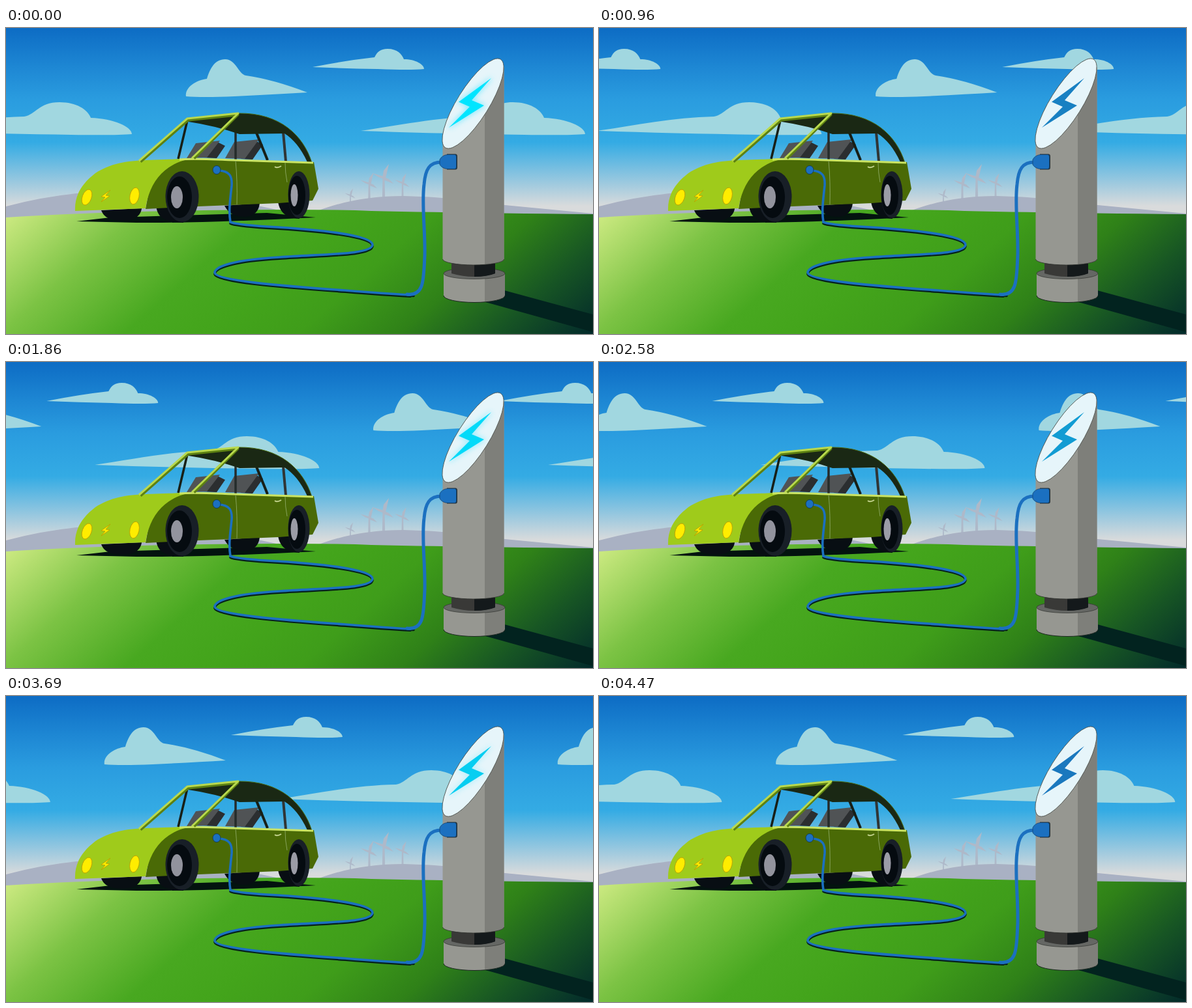
An HTML page that plays this animation: 900 by 470 pixels, repeating every 4500 ms.

```html
<!DOCTYPE html>
<html lang="en">
<head>
<meta charset="utf-8">
<title>Charging car</title>
<style>
html, body { margin: 0; width: 100%; height: 100%; overflow: hidden; background: #0d6bc3; }
svg { display: block; width: 900px; height: 470px; }
</style>
</head>
<body>
<svg viewBox="0 0 900 470">
<defs>
  <linearGradient id="sky" x2="0" y2="1">
    <stop stop-color="#0d6cc4"/><stop offset=".2" stop-color="#1d86d3"/>
    <stop offset=".38" stop-color="#2a9cdf"/><stop offset=".61" stop-color="#34abe4"/>
    <stop offset=".95" stop-color="#d9dbdc"/>
  </linearGradient>
  <linearGradient id="meadow" gradientUnits="userSpaceOnUse" x1="0" y1="287" x2="485" y2="838">
    <stop stop-color="#cdea82"/><stop offset=".18" stop-color="#7cc344"/>
    <stop offset=".35" stop-color="#48a820"/><stop offset=".47" stop-color="#43a41b"/>
    <stop offset=".59" stop-color="#3f9d1a"/><stop offset=".73" stop-color="#2f8118"/>
    <stop offset=".86" stop-color="#175524"/><stop offset="1" stop-color="#02292b"/>
  </linearGradient>
  <filter id="blur" x="-30%" y="-30%" width="160%" height="160%"><feGaussianBlur stdDeviation="4"/></filter>
  <g id="clouds" fill="#a1d7e0">
    <path d="M-151 158C-95 150-35 137 28 136C46 133 50 114 82 114C108 114 125 125 130 138C165 139 193 152 193 163Q170 165 100 164Q-40 162-151 158Z"/>
    <path d="M276 105C274 91 292 80 308 78C313 62 320 48 336 48C353 48 356 71 368 73Q410 79 462 99Q410 102 350 105Q300 107 276 105Z"/>
    <path d="M470 60Q520 50 565 45C569 37 574 32 585 32C600 32 607 40 610 48C628 48 641 56 641 63Q620 65 570 63Q520 62 470 60Z"/>
  </g>
  <g id="turbine" fill="#aeb9c9">
    <path d="M-1.5 0H1.5L2.2 34H-2.2Z"/>
    <path d="M-2 1L0-11L8-21L3 1ZM2 3L-8-1L-17-7L0-2ZM-1-2L8 2L15 9L-1 3Z"/>
  </g>
  <path id="bolt" d="M744 77L694 113.5L711 121L679 153L733 119L714 111Z"/>
  <path id="hose" d="M344 298C349 301 370 303 400 305C490 310 562 319 562 333C561 348 490 347 420 352C350 356 320 366 320 376C322 388 420 396 520 403Q580 408 620 410"/>
</defs>

<path fill="url(#sky)" d="M0 0H900V288H0Z"/>
<g id="drift">
  <use href="#clouds" x="-695"/><use href="#clouds"/><use href="#clouds" x="695"/>
</g>

<!-- landscape -->
<use href="#turbine" transform="translate(579 230)"/>
<use href="#turbine" transform="translate(557 239) scale(.8)"/>
<use href="#turbine" transform="translate(608 238) scale(.7)"/>
<use href="#turbine" transform="translate(528 257) scale(.5)"/>
<path fill="#a9b1c3" d="M0 274Q60 258 120 253Q280 245 440 285H468Q530 258 610 258Q690 260 765 272L900 285V300H0Z"/>
<path fill="url(#meadow)" d="M0 291Q110 284 250 281Q460 277 560 281Q700 284 900 286V470H0Z"/>
<path fill="#02231f" d="M764 403L900 440V467L735 421Z"/>

<!-- car -->
<path fill="#03130f" d="M108 297L160 291L400 284L475 291Q300 300 200 299Z"/>
<g fill="#080e13">
  <path d="M146 280C150 291 160 296 180 296C197 296 207 288 208 277Z"/>
  <path d="M335 273C342 286 352 290 368 290C380 289 388 281 389 269Z"/>
  <path d="M230 274C233 290 240 298 272 299V260Z"/>
  <path d="M417 267C420 284 430 292 450 293V255Z"/>
</g>
<g fill="#505355">
  <path fill="#2b2e30" d="M302 199L322 174L336 181L323 200ZM360 201L380 172L394 179L378 202Z"/>
  <path d="M277 200L291 177L328 173L308 199ZM336 200L350 175L388 171L366 201Z"/>
</g>
<g fill="none" stroke="#171f17">
  <path stroke-width="3.5" d="M278 142L264 201"/>
  <path stroke-width="4" d="M384 161L401 203"/>
  <path stroke-width="3.5" stroke="#252b2b" d="M352 136V202"/>
  <path stroke-width="4" stroke="#303535" d="M425 160L429 205"/>
</g>
<path fill="#1a2814" d="M280 140L356 131C420 130 456 165 469 207L462 206C452 184 440 170 427 162L358 163Q320 150 280 144Z"/>
<path fill="none" stroke="#4a6910" d="M356 131C420 130 456 165 469 207"/>
<path fill="#4a6a06" d="M214 278L222 235Q240 204 285 200L472 206L479 247L470 265L418 269L295 274L232 277Z"/>
<path fill="#9fcb1b" d="M106 281C105 258 115 240 137 223C160 208 185 204 215 203Q250 202 290 200C245 205 220 235 214 277Z"/>
<path fill="none" stroke="#cbe463" stroke-width="3" d="M266 202Q285 200 350 203L471 207"/>
<g fill="none" stroke-linejoin="round">
  <path stroke="#5d8012" stroke-width="5" d="M206 205L279 141L355 133L288 200"/>
  <path stroke="#b9d94e" stroke-width="3" d="M204 204L278 139L356 131L285 200"/>
  <path stroke="#86a35a" d="M352 204Q355 235 354 271M428 207Q428 222 431 237"/>
  <path stroke="#c0d08a" stroke-width="2" d="M412 213Q416 216 422 212"/>
</g>
<ellipse cx="270" cy="259" rx="25.5" ry="39" fill="#181f27"/>
<ellipse cx="266" cy="260" rx="19" ry="32" fill="#050b10"/>
<ellipse cx="262" cy="260" rx="9" ry="17" fill="#92939d"/>
<ellipse cx="449" cy="256" rx="16.5" ry="36" fill="#181f27"/>
<ellipse cx="446" cy="257" rx="13" ry="30" fill="#050b10"/>
<ellipse cx="442" cy="257" rx="5.5" ry="17" fill="#9b9ca6"/>
<g fill="#ffed00" stroke="#b99b00" stroke-width=".8">
  <ellipse rx="7" ry="12.5" transform="translate(124 260) rotate(20)"/>
  <ellipse rx="7" ry="13" transform="translate(197 258) rotate(12)"/>
  <path d="M160 249L146 259L152 260L146 267L159 258L153 257Z"/>
</g>

<!-- cable -->
<g fill="none" stroke-linecap="round" stroke-width="3.6">
  <use href="#hose" y="2.2" stroke="#06201b"/>
  <path stroke="#06201b" d="M610 411L625 411.5"/>
  <use href="#hose" stroke="#1b70c0"/>
  <path stroke="#1b70c0" d="M325 219C343 219 347 228 346 242C344 262 341 280 344 298"/>
  <path stroke="#1b70c0" stroke-width="5" d="M615 409C642 412 640 385 642 350C643 310 637 270 641 240C643 217 649 206 668 206"/>
</g>
<ellipse cx="323" cy="218" rx="6" ry="6.5" fill="#1b70c0" stroke="#12344d" stroke-width=".8"/>

<!-- charging post -->
<path fill="#969791" d="M671 377V411A47 10.5 0 0 0 765 411V377Z"/>
<path fill="#7e7f7a" d="M734 377V420.5Q765 418 765 411V377Z"/>
<path fill="none" stroke="#1c2620" d="M671 411A47 10.5 0 0 0 765 411"/>
<ellipse cx="718" cy="377" rx="47" ry="8.5" fill="#656764" stroke="#30332f" stroke-width=".7"/>
<path fill="#393937" d="M683 355H750V377Q718 387 683 377Z"/>
<path fill="#14191b" d="M718 355H750V377Q738 382 718 382Z"/>
<path fill="#969791" d="M669.5 165L763.5 60V355A47 9 0 0 1 669.5 355Z"/>
<path fill="#7e7f7a" d="M734 93L763.5 60V355Q763 361 734 363Z"/>
<path fill="none" stroke="#30332f" stroke-width=".8" d="M669.5 355A47 9 0 0 0 763.5 355"/>
<ellipse rx="80" ry="24.3" transform="translate(716 116) rotate(-58)" fill="#e6f5fa" stroke="#4a4d49" stroke-width=".8"/>
<use id="glow" href="#bolt" fill="#4fe3ff" stroke="#4fe3ff" stroke-width="3" filter="url(#blur)"/>
<use id="flash" href="#bolt"/>
<path fill="#26333b" d="M676 193.5H689Q692 193.5 692 197V214Q692 217.5 689 217.5H676Z"/>
<path fill="#1b70c0" stroke="#123e66" stroke-width=".7" d="M665 202Q669 195 677 194.5H688Q690.500 194.500 690.500 198V213Q690.500 216.500 688 216.500H677Q669 216 665 210Z"/>
</svg>
<script>
const LOOP = 4500, STEP = 30, TILE = 695, PULSE = 600;
const DIM = [27, 117, 188], BRIGHT = [0, 229, 255];
const [drift, glow, flash] = ['drift', 'glow', 'flash'].map(id => document.getElementById(id));

function draw() {
  const t = Math.floor(performance.now() % LOOP / STEP) * STEP;
  const power = (1 + Math.cos(t / PULSE * 2 * Math.PI)) / 2;
  drift.setAttribute('transform', `translate(${TILE * t / LOOP})`);
  flash.setAttribute('fill', `rgb(${DIM.map((c, i) => Math.round(c + (BRIGHT[i] - c) * power))})`);
  glow.setAttribute('opacity', Math.max(0, (power - .6) / .4) * .6);
  requestAnimationFrame(draw);
}
draw();
</script>
</body>
</html>
```
